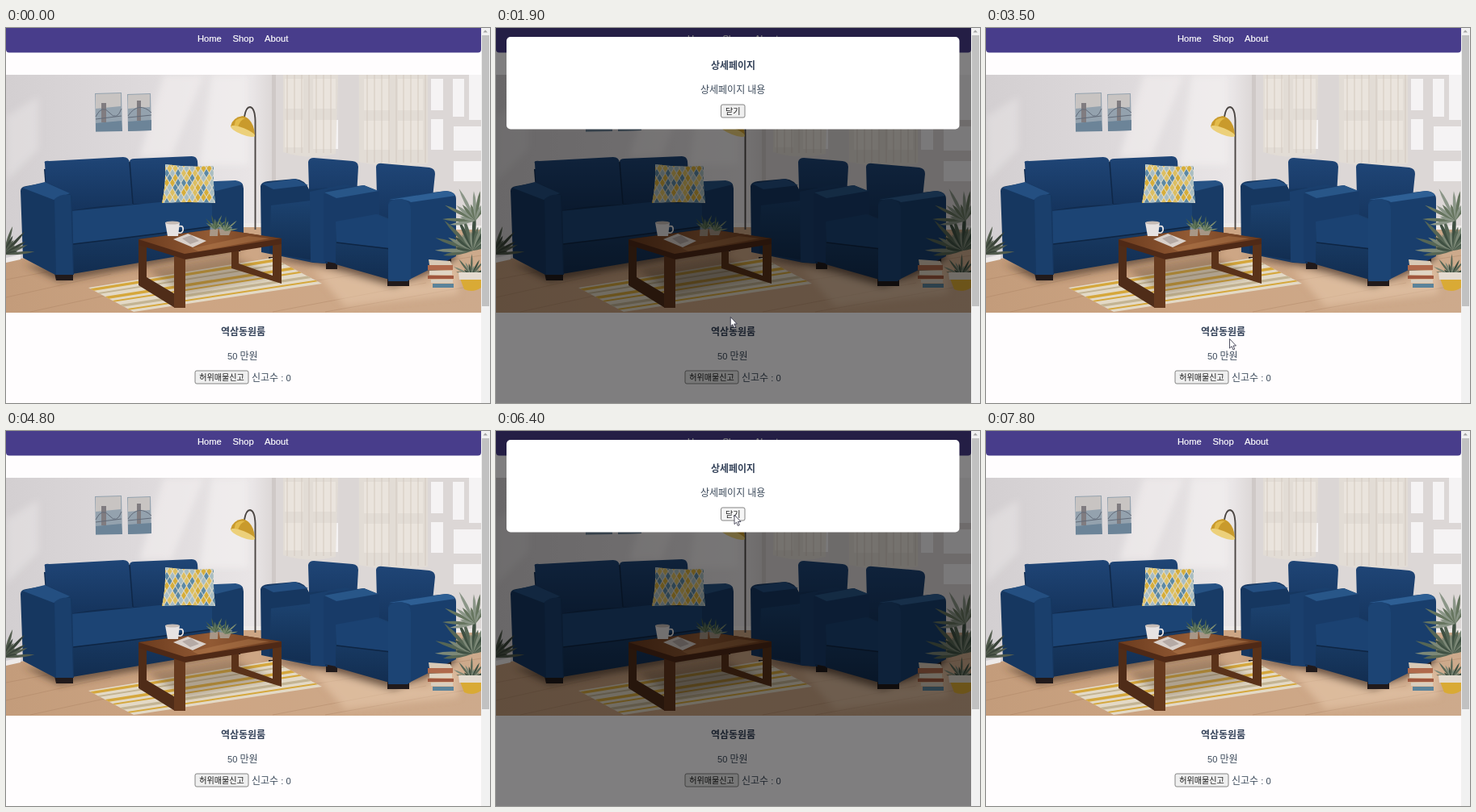
An HTML page for the animation above (7.9 s loop, 599 px wide and 465 px high).

```html
<!DOCTYPE html>
<html lang="ko">
<head>
<meta charset="utf-8">
<style>
html, body { margin: 0; width: 100%; height: 100%; overflow: hidden; background: #fffdfe; }
svg { display: block; width: 599px; height: 465px; }
text { font-family: "Liberation Sans", "Noto Sans CJK KR", "Noto Sans CJK", sans-serif; font-size: 11.2px; fill: #3c4a5b; }
.ko { font-size: 12px; }
.mid { text-anchor: middle; }
.bold { font-weight: 700; fill: #35435a; }
.btn { font-size: 10.1px; fill: #1c1c1c; text-anchor: middle; }
.nav { fill: #fff; stroke: #fff; stroke-width: .2; }
.box { fill: #efefef; stroke: #767676; stroke-width: .9; }
</style>
</head>
<body>
<svg viewBox="0 0 599 465">
  <defs>
    <clipPath id="frame"><rect y="58" width="588" height="294.5"/></clipPath>
    <clipPath id="cushion"><path d="M197 169Q226 173 257 171Q256 195 259 217Q225 215 193 217Q198 194 197 169Z"/></clipPath>
    <linearGradient id="wall">
      <stop offset="0" stop-color="#d3cfd1"/><stop offset=".3" stop-color="#dedadc"/>
      <stop offset=".52" stop-color="#e9e5e6"/><stop offset=".57" stop-color="#d9d4d3"/><stop offset="1" stop-color="#e6e2e2"/>
    </linearGradient>
    <linearGradient id="floor" x2="1">
      <stop offset="0" stop-color="#c39c7b"/><stop offset=".4" stop-color="#cda583"/><stop offset="1" stop-color="#cdaa8c"/>
    </linearGradient>
    <linearGradient id="seat" x2="0" y2="1">
      <stop offset="0" stop-color="#1c426f"/><stop offset="1" stop-color="#122d50"/>
    </linearGradient>
    <linearGradient id="back" x2="0" y2="1">
      <stop offset="0" stop-color="#1f4576"/><stop offset="1" stop-color="#15345d"/>
    </linearGradient>
    <linearGradient id="wood">
      <stop offset="0" stop-color="#6b3b1e"/><stop offset=".5" stop-color="#925a34"/><stop offset="1" stop-color="#6b3b1e"/>
    </linearGradient>
    <filter id="soft" x="-30%" y="-30%" width="160%" height="160%"><feGaussianBlur stdDeviation="4"/></filter>
  </defs>

  <rect width="599" height="465" fill="#fffdfe"/>
  <path d="M0 0H588V26.5Q588 30.5 584 30.5H4Q0 30.5 0 26.5Z" fill="#483d8b"/>
  <text class="nav" x="237" y="17">Home</text>
  <text class="nav" x="280.5" y="17">Shop</text>
  <text class="nav" x="320" y="17">About</text>

  <g clip-path="url(#frame)">
    <rect y="58" width="588" height="295" fill="url(#wall)"/>
    <g filter="url(#soft)" fill="#f3f0f0">
      <path d="M195 58H245L205 160H165Z" opacity=".6"/>
      <path d="M255 58H300V170H240Z" opacity=".7"/>
      <path d="M0 110L40 85V150L0 190Z" opacity=".35"/>
    </g>
    <!-- windows -->
    <path d="M333 58H588V252H333Z" fill="#dcd7d6"/>
    <path d="M345 63H368V100H345ZM380 63H408V100H380ZM345 114H368V148H345ZM380 114H411V150H380ZM443 63H475V102H443ZM485 63H516V102H485ZM443 115H475V151H443ZM485 115H516V151H485ZM526 63H541V102H526ZM526 113H541V151H526ZM553 63H567V110H553ZM573 58H588V114H573ZM554 122H588V152H554ZM554 165H588V190H554Z" fill="#f5f3f4"/>
    <path d="M343 58H411L408 156Q376 164 343 154ZM437 58H522V168Q480 176 437 166Z" fill="#e6ded5" opacity=".7"/>
    <g id="folds" stroke="#d0c5ba" stroke-width="2" opacity=".4"/>
    <path d="M412 58H436V186H412Z" fill="#dbd6d5"/>
    <path d="M329 58H334V245H329Z" fill="#cfc9c7"/>

    <path d="M0 290L60 277L300 243L588 250V353H0Z" fill="url(#floor)"/>
    <path d="M0 285L18 281V287L0 291ZM294 242H316V247H294ZM553 245H588V250H553Z" fill="#eeeae8"/>
    <g stroke="#a47c5c" stroke-width=".7" opacity=".5" fill="none">
      <path d="M0 312L105 292M0 334L130 305M30 352L200 315M395 352L588 318M330 352L520 316M340 320L588 282"/>
    </g>
    <g filter="url(#soft)">
      <path d="M380 300L520 318L560 290V330L420 345Z" fill="#e7c9ab" opacity=".6"/>
      <path d="M22 292L66 314L290 274V262L80 300Z" fill="#4e392d" opacity=".75"/>
      <path d="M318 284L390 296L480 322L556 290V276Z" fill="#4e392d" opacity=".7"/>
    </g>

    <!-- wall pictures -->
    <path d="M110 81L143 80L144 128L111 129ZM150 82L179 81L180 127L151 128Z" fill="#94a2ae"/>
    <path d="M111 82L142 81V97L111 100ZM151 83L178 82V98L151 100Z" fill="#c8c4c2"/>
    <path d="M111 118L143 115L144 128H111ZM151 116L180 114V127L151 128Z" fill="#6c8498"/>
    <path d="M118 93H124V117H118ZM162 90H167V115H162Z" fill="#807c80"/>
    <path d="M111 110Q119 94 128 105T143 100M151 109Q164 90 180 105M111 113L143 109M151 111L180 108" fill="none" stroke="#626b79"/>

    <!-- lamp -->
    <path d="M308.5 250V115Q308 99 302 98Q297 98 295 110" fill="none" stroke="#4b4643" stroke-width="1.9"/>
    <path d="M278 122Q280 111 293 109Q307 113 308 134Q294 131 278 122Z" fill="#c99a2c"/>
    <path d="M284 115Q289 110 296 112Q289 114 287 124L282 123Z" fill="#e3bb4a"/>
    <ellipse cx="293" cy="128" rx="16" ry="4" transform="rotate(22 293 128)" fill="#ecd07a"/>

    <!-- sofa -->
    <path d="M60 304H83V313H62ZM280 270H290V277H280Z" fill="#211a1b"/>
    <path d="M47 175L236 166L240 230L52 240Z" fill="#112c50"/>
    <path d="M48 168Q46 164 54 165L145 160Q152 160 153 167L157 219Q120 219 83 226L50 200Z" fill="url(#back)"/>
    <path d="M153 166Q153 162 159 162L230 159Q236 159 237 165L240 212L190 218L157 218Z" fill="url(#back)"/>
    <path d="M153 166L157 218" stroke="#0f2747" stroke-width="1.5"/>
    <path d="M78 228L250 215L285 225V271L82 305Z" fill="url(#seat)"/>
    <path d="M80 227L190 216L250 218Q260 220 258 228L254 246Q160 259 83 268Z" fill="#1c4474"/>
    <path d="M83 268Q170 258 255 246" fill="none" stroke="#0e2543" stroke-width="1.6"/>
    <path d="M18 202Q18 197 25 196L48 192Q55 192 76 204Q82 206 82 214L84 306H61L21 285Z" fill="#163760"/>
    <path d="M20 198L48 191L79 205L59 213Z" fill="#244f81"/>
    <path d="M60 212Q69 205 80 207L83 306H62Z" fill="#1a3f6c"/>
    <path d="M235 191L286 190Q294 191 294 199V264Q294 271 283 273L255 277V220Q255 203 235 199Z" fill="#183b66"/>
    <path d="M237 191L284 189Q291 190 293 194L260 202Q250 197 237 198Z" fill="#265284"/>

    <g clip-path="url(#cushion)">
      <rect x="190" y="165" width="72" height="55" fill="#e0dbcd"/>
      <g id="diamonds"/>
    </g>

    <!-- armchairs -->
    <path d="M325 284H335V291H325ZM396 287H410V299H396ZM472 309H499V320H472ZM541 286H551V293H541Z" fill="#211a1b"/>
    <path d="M374 166Q375 161 381 161L429 165Q436 166 436 172L433 226L376 232Z" fill="url(#back)"/>
    <path d="M315 196Q316 191 324 190L358 187Q370 188 375 200L398 198V292L380 291L316 278Z" fill="#163760"/>
    <path d="M328 220L377 214L398 222V291L326 279Z" fill="url(#seat)"/>
    <path d="M317 193L358 187L374 195L331 200Z" fill="#244f81"/>
    <path d="M376 203L419 194L437 198V206L395 209V292L377 290Z" fill="#1a3f6d"/>
    <path d="M458 172Q459 167 466 168L524 173Q531 174 531 181L525 240L460 245Z" fill="url(#back)"/>
    <path d="M393 207Q394 201 402 200L443 195L462 203V235L409 242V292L393 289Z" fill="#183b68"/>
    <path d="M394 204L443 195L461 202L409 211Z" fill="#285688"/>
    <path d="M408 241L460 231L478 238V313L408 293Z" fill="url(#seat)"/>
    <path d="M408 240L458 231L477 239L476 273L409 266Z" fill="#1b4272"/>
    <path d="M409 266L476 274" stroke="#0e2543" stroke-width="1.5"/>
    <path d="M473 218Q474 209 485 209L545 202Q557 203 557 212V283L497 313H473Z" fill="#193e6c"/>
    <path d="M474 213L544 202Q554 203 556 208L501 216Q497 212 474 213Z" fill="#2e5f94"/>
    <path d="M473 219Q476 211 490 212Q501 214 501 225V311L497 314H473Z" fill="#1c4474"/>

    <!-- rug -->
    <path d="M102 322L330 285L391 317L158 352Z" fill="#e3d9c6"/>
    <g id="rug"/>

    <!-- table -->
    <g filter="url(#soft)"><path d="M175 300L279 282L330 308L222 330Z" fill="#4e392d" opacity=".35"/></g>
    <path d="M164 267H174V309L211 331V280H222V347H209L164 319Z" fill="#4f2c18"/>
    <path d="M173 269H211V280Z" fill="#412413"/>
    <path d="M279 272H288V292L330 307V264H341V317L279 298Z" fill="#5a3219"/>
    <path d="M208 281H222V347H208Z" fill="#65391e"/>
    <path d="M164 262L262 249L341 261V268L222 287L164 269Z" fill="#4f2916"/>
    <path d="M164 262L262 249L341 261L221 280Z" fill="url(#wood)"/>
    <path d="M230 273L300 258L326 261L238 277Z" fill="#b57e50" opacity=".45"/>

    <path d="M214 246Q220 244 219 251Q217 256 212 253" fill="none" stroke="#e9e5e4" stroke-width="1.8"/>
    <path d="M197 241H215L213 258H200Z" fill="#e6e2e2"/>
    <ellipse cx="206" cy="241.5" rx="9" ry="2" fill="#c5bbb5"/>
    <path d="M207 262L225 255L248 264L231 272Z" fill="#d9d0ca"/>
    <path d="M218 261L229 257L239 264L228 268Z" fill="#b5aaa5"/>
    <path d="M253 242L263 244L262 258H252ZM263 247H280L276 257H265Z" fill="#b9c2bf" opacity=".6"/>
    <g id="leaves"/>

    <!-- books and pots -->
    <path d="M523 287L550 289L553 296L524 294Z" fill="#d9cab6"/>
    <path d="M522 294H553V300H522Z" fill="#b06a4c"/>
    <path d="M524 301H552V306H524Z" fill="#e0d5c4"/>
    <path d="M522 307H554V311H522Z" fill="#a0583f"/>
    <path d="M526 312H553V316H526Z" fill="#d8cebf"/>
    <path d="M528 317H554V322H528Z" fill="#5b839a"/>
    <path d="M561 308H588V322Q578 329 567 324Z" fill="#d9aa35"/>
    <path d="M560 303H588V312H561Z" fill="#e4dbd0"/>
  </g>

  <text class="mid bold ko" x="293.5" y="381">역삼동원룸</text>
  <text x="274" y="411">50 <tspan class="ko">만원</tspan></text>
  <rect class="box" x="234" y="425" width="66" height="16" rx="2"/>
  <text class="btn" x="267" y="437">허위매물신고</text>
  <text x="304" y="437.5"><tspan class="ko">신고수</tspan> : 0</text>

  <g id="modal">
    <rect width="588" height="465" opacity=".5"/>
    <rect x="13" y="11" width="560.5" height="114.5" rx="5" fill="#fff"/>
    <text class="mid bold ko" x="293.5" y="51">상세페이지</text>
    <text x="253" y="81"><tspan class="ko">상세페이지</tspan> <tspan class="ko">내용</tspan></text>
    <rect id="close" class="box" x="278.5" y="95" width="29.5" height="16" rx="2"/>
    <text class="btn" x="293.3" y="107">닫기</text>
  </g>

  <rect x="588" width="11" height="465" fill="#f1f1f1"/>
  <rect x="589" y="9" width="9" height="336" fill="#c1c1c1"/>
  <path d="M590.5 5.5L593.2 2.5L596 5.5Z" fill="#a3a3a3"/>

  <path id="cursor" d="M0 0V11.6L2.6 9.2L4.4 13.4L6.3 12.6L4.5 8.5H8Z" fill="#fff" stroke="#26263c" stroke-width=".8"/>
</svg>
<script>
const LOOP = 7900, STEP = 100;
const $ = id => document.getElementById(id);

function add(parent, d, attrs) {
  const el = document.createElementNS("http://www.w3.org/2000/svg", "path");
  el.setAttribute("d", d);
  for (const k in attrs) el.setAttribute(k, attrs[k]);
  $(parent).append(el);
}

for (let x = 348; x < 521; x += 9) {
  if (x < 409 || x > 438) add("folds", `M${x} 58V${x < 410 ? 155 : 167}`);
}

const tints = ["#d6ae3a", "#5c89a4", "#dcbf62", "#a8bdc2"];
for (let row = 0; row < 9; row++) {
  for (let col = 0; col < 11; col++) {
    const x = 192 + col * 7 + (row % 2) * 3.5, y = 168 + row * 6;
    add("diamonds", `M${x} ${y - 5}L${x + 3} ${y}L${x} ${y + 5}L${x - 3} ${y}Z`,
      { fill: tints[(col * 3 + row * 2 + (col * row) % 3) % 4] });
  }
}

// Stripes run along the long side of the rug.
const left = k => `${102 + 56 * k} ${322 + 30 * k}`;
const right = k => `${330 + 61 * k} ${285 + 32 * k}`;
for (let i = 0; i < 6; i++) {
  const a = .04 + i * .165, b = a + (i % 2 ? .05 : .085);
  add("rug", `M${left(a)}L${right(a)}L${right(b)}L${left(b)}Z`, { fill: i % 3 == 1 ? "#c3b493" : "#d5a73c" });
}

function plant(x, y, n, len, from, to, tones) {
  for (let i = 0; i < n; i++) {
    const a = from + (to - from) * i / (n - 1), r = len * (.72 + .28 * Math.sin(i * 2.4));
    const c = Math.cos(a), s = Math.sin(a), w = len * .09;
    const mx = x + c * r * .6, my = y + s * r * .6;
    add("leaves", `M${x} ${y}Q${mx - s * w} ${my + c * w} ${x + c * r} ${y + s * r}Q${mx + s * w} ${my - c * w} ${x} ${y}Z`,
      { fill: tones[i % tones.length] });
  }
}
const greens = ["#566655", "#7c8877", "#3f5042"];
plant(578, 276, 19, 52, -3.3, -.4, greens);
plant(581, 239, 12, 45, -3.3, -1, ["#8b9688", "#66755f"]);
plant(576, 307, 13, 27, -2.9, -.2, greens);
plant(-3, 281, 12, 39, -1.7, -.1, ["#3a4439", "#535d4e"]);
plant(259, 250, 9, 20, -2.5, -.7, ["#6d805e", "#465d45"]);
plant(271, 252, 9, 20, -2.3, -.2, ["#82906f", "#526a4b"]);

// time, x, y of the pointer tip
const path = [
  [400, 300, -14], [1200, 287, 365], [1300, 286, 369], [1600, 290, 373], [1800, 290, 373],
  [2500, 295, 110], [2700, 293, 102], [3100, 293, 102], [3500, 301.5, 385.5], [3700, 303, 390],
  [4000, 301, 387], [4300, 301, 387], [4700, 294, 374], [5200, 294, 374], [5800, 295, 104],
  [6800, 295, 104], [7400, -14, 140]
];

function pointer(t) {
  const i = path.findIndex(p => p[0] > t);
  if (i < 1) return null;
  const [t0, x0, y0] = path[i - 1], [t1, x1, y1] = path[i];
  const u = (t - t0) / (t1 - t0), e = u * u * (3 - 2 * u);
  return [x0 + (x1 - x0) * e, y0 + (y1 - y0) * e];
}

const within = (t, a, b) => t >= a && t < b;

function draw(ms) {
  const t = Math.floor(ms % LOOP / STEP) * STEP;
  const open = within(t, 1800, 3100) || within(t, 5000, 6500);
  const pos = within(t, 4700, 5000) ? null : pointer(t);
  $("modal").style.display = open ? "" : "none";
  $("cursor").style.display = pos ? "" : "none";
  if (pos) $("cursor").setAttribute("transform", `translate(${pos})`);
  const hover = pos && within(pos[0], 278, 308) && within(pos[1], 95, 111);
  const pressed = within(t, 3000, 3100) || within(t, 6400, 6500);
  $("close").style.fill = pressed ? "#f5f5f5" : hover ? "#e2e2e2" : "#efefef";
}

const start = performance.now();
function tick() {
  draw(performance.now() - start);
  requestAnimationFrame(tick);
}
tick();
</script>
</body>
</html>
```
